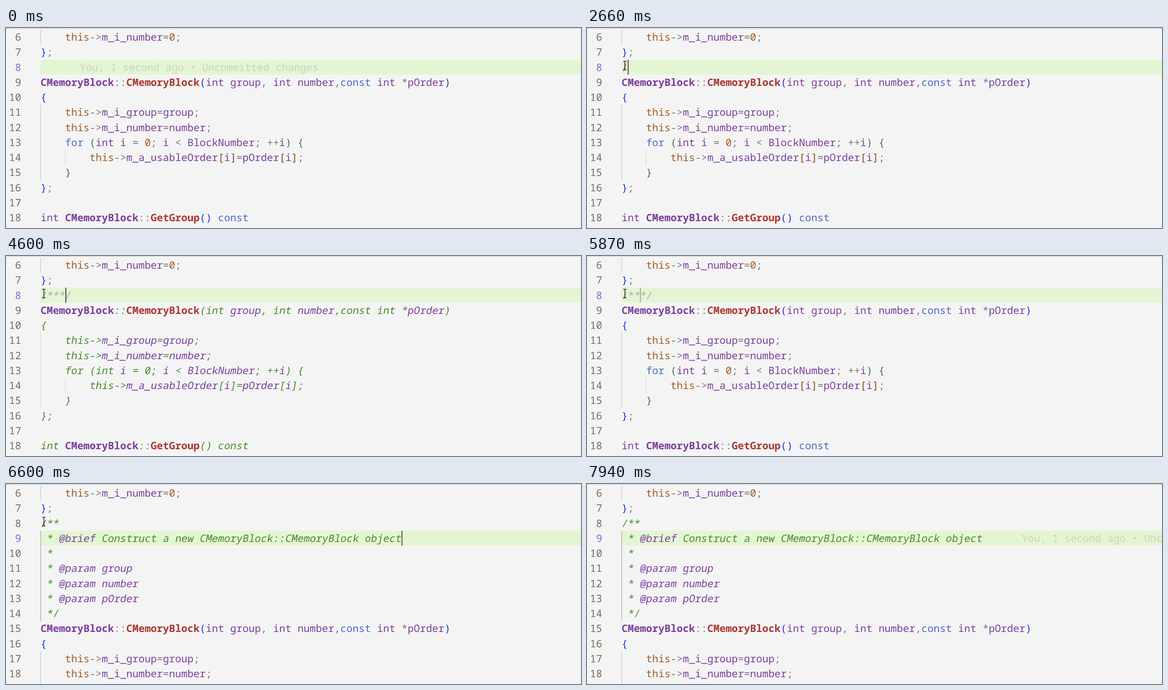
Write an HTML page with a canvas that moves like this. It is 1268x442 px and loops after 8340 ms.

```html
<!DOCTYPE html>
<html lang="en">
<head>
<meta charset="utf-8">
<title>Doc comment in a code editor</title>
<style>
html, body { margin: 0; height: 100%; overflow: hidden; background: #f4f4f4; }
canvas { display: block; }
</style>
</head>
<body>
<canvas id="stage" width="1268" height="442"></canvas>
<script>
const ctx = document.getElementById('stage').getContext('2d');
const LOOP = 8340, CHAR = 13.49, ROW = 33.25, LEFT = 76.3;
const PURPLE = '#7a3e9d', GREEN = '#448c27', PALE = '#aaaaaa', GREY = '#777777';
const BLUE = '#4b69c6', BROWN = '#9c5d27', RED = '#aa3731';
const BRACKETS = ['#0f3be6', '#3f7350', '#8a4a1c'];

const headLines = ['    this->m_i_number=0;', '};'];
const bodyLines = [
  'CMemoryBlock::CMemoryBlock(int group, int number,const int *pOrder)',
  '{',
  '    this->m_i_group=group;',
  '    this->m_i_number=number;',
  '    for (int i = 0; i < BlockNumber; ++i) {',
  '        this->m_a_usableOrder[i]=pOrder[i];',
  '    }',
  '};',
  '',
  'int CMemoryBlock::GetGroup() const'
];
const docLines = [
  '/**',
  ' * @brief Construct a new CMemoryBlock::CMemoryBlock object',
  ' *',
  ' * @param group',
  ' * @param number',
  ' * @param pOrder',
  ' */'
];

// Caret stops: time, row, column
const stops = [
  [980, 8, 0], [2040, 8, 1], [2880, 8, 2], [3130, 8, 3], [3370, 8, 4],
  [4590, 8, 5], [4920, 8, 4], [5160, 8, 3], [5965, 9, 59]
];
const OPEN = 2880, DOC_OPEN = 3130, CLOSE = 4590, RECOLOUR = 4640, EXPAND = 5965, BLAME = 7350;

const rowY = row => 70 + (row - 8) * ROW;
const colX = col => LEFT + col * CHAR;
const mix = (a, b, k) => a + (b - a) * k;
const ease = k => { k = Math.min(1, Math.max(0, k)); return k * k * (3 - 2 * k); };

function rect(x, y, w, h, color) {
  ctx.fillStyle = color;
  ctx.fillRect(x, y, w, h);
}

function drawText(text, x, row, color, style = '') {
  ctx.font = (style === 'bold' ? 'bold ' : '') + '22.48px "Noto Sans Mono", "DejaVu Sans Mono", monospace';
  ctx.textRendering = 'geometricPrecision';
  ctx.fillStyle = color;
  const slant = style === 'italic' ? -0.18 : 0;
  [...text].forEach((c, i) => {
    if (c === ' ') return;
    ctx.setTransform(1, 0, slant, 1, x + i * CHAR + slant * 5, rowY(row) + 24.5);
    ctx.fillText(c, 0, 0);
  });
  ctx.resetTransform();
}

let depth;
function bracketColor(c) {
  return BRACKETS['([{'.includes(c) ? depth++ : --depth];
}

// A comment colour replaces everything but the semantic names
function codeLine(line, row, comment) {
  for (const m of line.matchAll(/\w+|[()[\]{}]|[^\w\s()[\]{}]+/g)) {
    const word = m[0], next = line[m.index + word.length];
    let color = GREY, style = '', semantic = false;
    if (/^(CMemoryBlock|GetGroup)$/.test(word)) {
      color = next === '(' ? RED : PURPLE;
      style = 'bold';
      semantic = true;
    } else if (/^(this|0)$/.test(word)) color = BROWN;
    else if (/^(const|for)$/.test(word)) color = BLUE;
    else if (word === 'int') color = PURPLE;
    else if (/^\w/.test(word)) { color = PURPLE; semantic = true; }
    else if (/[()[\]{}]/.test(word)) color = bracketColor(word);
    if (comment) {
      if (!semantic) color = comment;
      if (style !== 'bold') style = 'italic';
    }
    drawText(word, colX(m.index), row, color, style);
  }
}

function docLine(line, row) {
  for (const m of line.matchAll(/@brief|@param \w+|[^@]+/g))
    drawText(m[0], colX(m.index), row, m[0][0] === '@' ? PURPLE : GREEN, 'italic');
}

function guide(col, from, to, color) {
  rect(Math.round(colX(col)), Math.round(rowY(from)), 1, Math.round((to - from + 1) * ROW), color);
}

function typedLine(t, n) {
  if (t < 2040) return;
  const text = '/***/'.slice(0, t >= CLOSE ? 5 : stops[n][2]);
  if (t < OPEN) drawText(text, LEFT, 8, GREY);
  else drawText(text, LEFT, 8, t >= DOC_OPEN && t < CLOSE ? GREEN : PALE, 'italic');
}

function drawCaret(t, n) {
  if (n < 0) return;
  const [start, row, col] = stops[n], [, row0, col0] = stops[Math.max(0, n - 1)];
  const age = t - start, k = ease(age / 80);
  // Solid after input, then a smooth blink with a 1 s period
  const beat = age < 500 ? 0 : (age - 500) % 1000;
  ctx.globalAlpha = beat < 500 ? 1 - ease((beat - 100) / 200) : ease((beat - 700) / 200);
  rect(mix(colX(col0), colX(col), k), mix(rowY(row0), rowY(row), k), 2, 33, '#453c3e');
  ctx.globalAlpha = 1;
}

function drawPointer(t) {
  if (t < 140 || t >= 7940) return;
  const k = t < 4000 ? 1 - ease((t - 140) / 780) : ease((t - 7110) / 830);
  const x = Math.round(mix(83, 1128, k)) + 0.5, y = Math.round(mix(83, 456, k));
  ctx.beginPath();
  for (const s of [-1, 1]) {
    ctx.moveTo(x - 3.5, y + 9.5 * s);
    ctx.lineTo(x - 1, y + 9.5 * s);
    ctx.lineTo(x, y + 8.5 * s);
    ctx.lineTo(x + 1, y + 9.5 * s);
    ctx.lineTo(x + 3.5, y + 9.5 * s);
  }
  ctx.moveTo(x, y - 8.5);
  ctx.lineTo(x, y + 8.5);
  ctx.lineWidth = 1.4;
  ctx.strokeStyle = '#111';
  ctx.stroke();
}

function draw(t) {
  const n = stops.filter(s => s[0] <= t).length - 1;
  const expanded = t >= EXPAND, active = expanded ? 9 : 8;
  const first = expanded ? 15 : 9;
  const comment = t < OPEN || t >= RECOLOUR ? '' : t < DOC_OPEN ? PALE : GREEN;

  rect(0, 0, 1268, 442, '#f4f4f4');
  rect(76, Math.round(rowY(active)), 1192, 33, '#e4f5d4');
  rect(0, 0, 1268, 1, '#c2c2c2');

  guide(0, 6, 6, '#b4b8f0');
  guide(0, first + 2, first + 6, comment ? '#d3d3d3' : '#b4b8f0');
  guide(4, first + 5, first + 5, comment || t >= RECOLOUR ? '#d0d0d0' : '#c6d6c6');
  if (expanded) guide(0, 9, 14, '#939393');

  for (let row = 6; row <= 18; row++)
    drawText(String(row).padStart(2), 6.5, row, row === active ? '#8468cc' : '#6d705b');

  depth = 1;
  headLines.forEach((line, i) => codeLine(line, 6 + i, ''));
  if (expanded) docLines.forEach((line, i) => docLine(line, 8 + i));
  else typedLine(t, n);
  bodyLines.forEach((line, i) => codeLine(line, first + i, comment));

  if (t < 2040 || t >= BLAME)
    drawText('You, 1 second ago • Uncommitted changes', colX(expanded ? 59 : 0) + 86.5, active, '#c9d5bf');
  drawCaret(t, n);
  drawPointer(t);
}

const begin = performance.now();
function frame() {
  draw((performance.now() - begin) % LOOP);
  requestAnimationFrame(frame);
}
frame();
</script>
</body>
</html>
```
